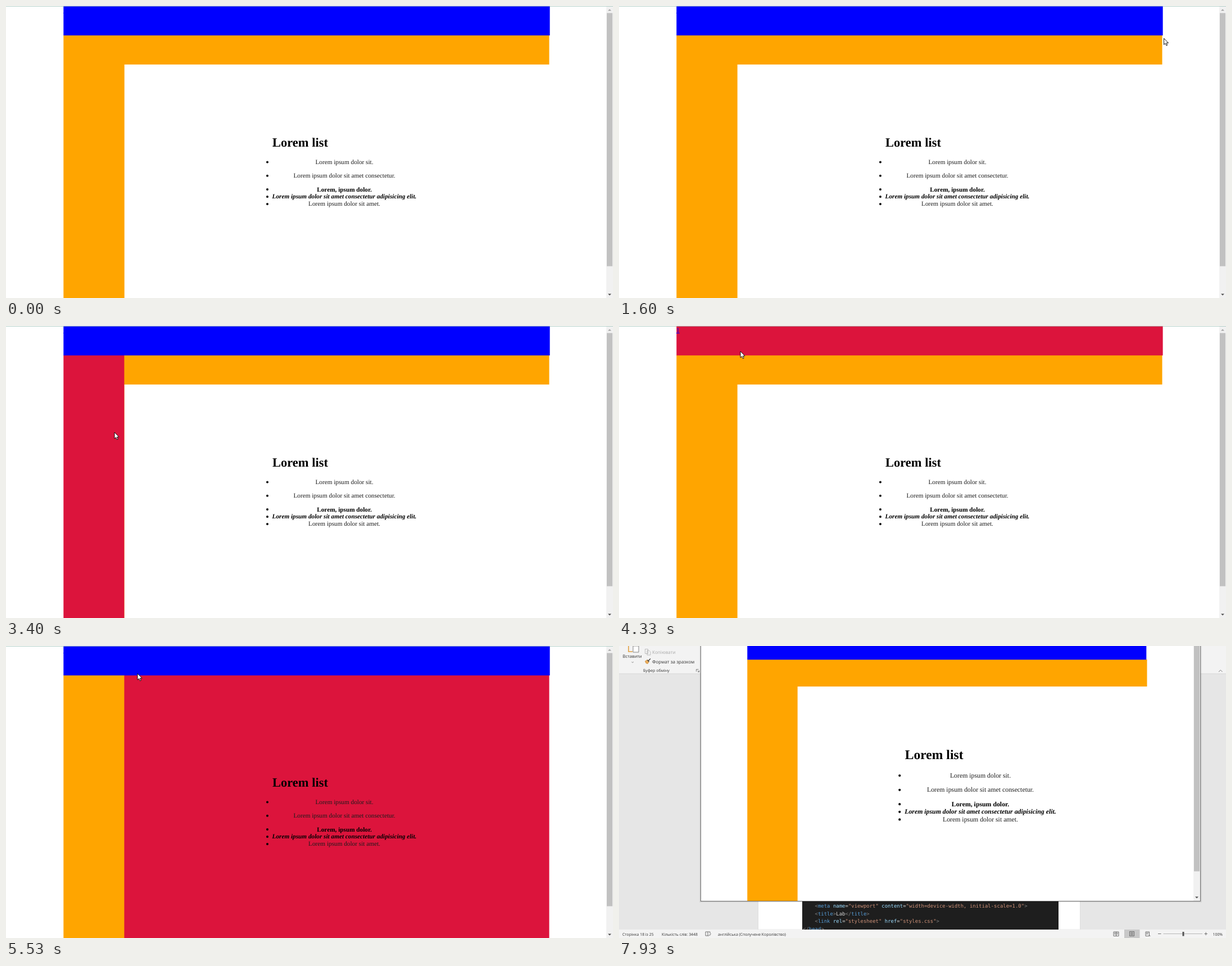
An HTML page for the animation above (8000 ms loop, 1080 by 519 pixels).

```html
<!DOCTYPE html>
<html lang="en">
<head>
<meta charset="utf-8">
<title>Hover demo</title>
<style>
html, body { margin: 0; height: 100%; overflow: hidden; background: #fff; }
svg { display: block; width: 100vw; height: 100vh; text-rendering: geometricPrecision; }
text { white-space: pre; }
.list { font: 11.25px "Liberation Serif", serif; }
.list .mid { text-anchor: middle; }
.list .b { font-weight: bold; }
.list .i { font-style: italic; }
.list .h { font-size: 22.5px; }
.ui { font: 6.9px "Open Sans", sans-serif; fill: #333; }
.code { font: 8.98px "DejaVu Sans Mono", monospace; fill: #9cdcfe; }
.tag { fill: #569cd6; }
.str { fill: #ce9178; }
.mark { fill: #808080; }
.txt { fill: #d4d4d4; }
</style>
</head>
<body>
<svg viewBox="0 0 1080 519" preserveAspectRatio="none">
  <defs>
    <g id="list" class="list">
      <text class="b h" x="474" y="250">Lorem list</text>
      <g class="mid">
        <text x="602" y="281" fill="#1c1c1c">Lorem ipsum dolor sit.</text>
        <text x="602" y="305.3" fill="#1c1c1c">Lorem ipsum dolor sit amet consectetur.</text>
        <text x="602" y="329.5" class="b">Lorem, ipsum dolor.</text>
        <text x="602" y="342.4" class="b i">Lorem ipsum dolor sit amet consectetur adipisicing elit.</text>
        <text x="602" y="355.3" fill="#1c1c1c">Lorem ipsum dolor sit amet.</text>
      </g>
      <path d="M465 277.5h0M465 301.8h0M465 326h0M465 339h0M465 352h0" stroke="#000" stroke-width="4" stroke-linecap="round"/>
    </g>
  </defs>

  <g id="page">
    <rect width="1080" height="519" fill="#fff"/>
    <g id="body">
      <rect id="main" x="210" y="52" width="756.5" height="530"/>
      <rect id="white" x="210.5" y="104" width="757" height="480" fill="#fff"/>
      <use href="#list"/>
    </g>
    <rect id="side" x="102.3" y="52" width="108.1" height="467"/>
    <rect id="head" x="102.3" width="865.3" height="52.3"/>
    <text class="list" x="102" y="11" fill="#00f" text-decoration="underline">1</text>
    <rect x="1068" width="12" height="519" fill="#f1f1f1"/>
    <rect id="thumb" x="1069" y="12.5" width="10" height="450" fill="#c1c1c1"/>
    <path id="up" d="M1071 8.5l3-3 3 3z"/>
    <path id="down" d="M1071 511.5l3 3 3-3z"/>
    <rect width="1080" height=".8" fill="#a5c8c0"/>
    <path id="arrow" d="M.5 .5V11.7L3.1 9.4 4.9 13.4 6.7 12.6 5 8.7H8.5Z" fill="#fff" stroke="#000" stroke-width=".9"/>
    <path id="beam" d="M-2-6.5H-.6L0-6 .6-6.5H2M0-6V6M-2 6.5H-.6L0 6 .6 6.5H2" fill="none" stroke="#333" stroke-width=".8"/>
  </g>

  <g id="desk">
    <rect width="1080" height="519" fill="#e6e6e6"/>
    <rect width="1080" height="49" fill="#f3f3f3"/>
    <path d="M0 49.3H1080M147.5 0V46" stroke="#d0d0d0" stroke-width=".7"/>
    <g class="ui">
      <text x="6.5" y="21" font-size="7.7">Вставити</text>
      <text x="59" y="14" font-size="8.1" fill="#aaa">Копіювати</text>
      <text x="59" y="30.5" font-size="8.1">Формат за зразком</text>
      <text x="43" y="46" font-size="7.1">Буфер обміну</text>
    </g>
    <g fill="none" stroke="#666" stroke-width=".8">
      <path d="M17 0V10H24" stroke="#e0a040" stroke-width="1.6"/>
      <path d="M25 0H35V11H25Z" fill="#fff"/>
      <path d="M22.5 28l1.7 1.7 1.7-1.7M137.5 45.5v-4h4M139.5 43.5l3 2.5M142.7 43.5v2.5h-2.6M1067 46l3.3-3.3 3.3 3.3"/>
      <path d="M46.5 5.5h5v8h-5zM50 8h3.500l2.500 2.500v5.500h-6z" stroke="#b0b0b0" fill="#f3f3f3"/>
      <path d="M46.5 27l4-2.500 3 3-2.500 4-3-1z" fill="#eeb060" stroke="#c88a30"/>
      <path d="M50.500 25l3 3M52 26.500l4-4" stroke="#444" stroke-width="1.4"/>
    </g>
    <rect x="247.500" y="440" width="573" height="64" fill="#fff" stroke="#d0d0d0" stroke-width=".6"/>
    <rect x="326" y="440" width="456" height="64" fill="#1e1e1e"/>
    <g class="code">
      <text x="348.500" y="465"><tspan class="mark">&lt;</tspan><tspan class="tag">meta</tspan> name<tspan class="txt">=</tspan><tspan class="str">"viewport"</tspan> content<tspan class="txt">=</tspan><tspan class="str">"width=device-width, initial-scale=1.0"</tspan><tspan class="mark">&gt;</tspan></text>
      <text x="348.500" y="478.500"><tspan class="mark">&lt;</tspan><tspan class="tag">title</tspan><tspan class="mark">&gt;</tspan><tspan class="txt">Lab</tspan><tspan class="mark">&lt;/</tspan><tspan class="tag">title</tspan><tspan class="mark">&gt;</tspan></text>
      <text x="348.500" y="492"><tspan class="mark">&lt;</tspan><tspan class="tag">link</tspan> rel<tspan class="txt">=</tspan><tspan class="str">"stylesheet"</tspan> href<tspan class="txt">=</tspan><tspan class="str">"styles.css"</tspan><tspan class="mark">&gt;</tspan></text>
      <text x="327" y="505.500"><tspan class="mark">&lt;/</tspan><tspan class="tag">head</tspan><tspan class="mark">&gt;</tspan></text>
    </g>
    <rect y="504" width="1080" height="15" fill="#f3f3f3"/>
    <g class="ui">
      <text x="6" y="514.500">Сторінка 18 із 25</text>
      <text x="76" y="514.500">Кількість слів: 3448</text>
      <text x="176" y="514.500">англійська (Сполучене Королівство)</text>
      <text x="1056.500" y="514.500">100%</text>
    </g>
    <rect x="899" y="504" width="27.500" height="15" fill="#c8c8c8"/>
    <g fill="none" stroke="#555" stroke-width=".8">
      <path d="M154 508h4v7h-4zM158 508h4v3M158 515h2M160 513l1.500 1.500 2-3.500"/>
      <path d="M880 508h4.500v7.500h-4.500zM884.500 508h4.500v7.500h-4.500zM881 510h2.500m2 0h2.500M881 512h2.500m2 0h2.500"/>
      <path d="M908.500 507.500h8v8h-8zM910 509.500h5m-5 2h5m-5 2h5"/>
      <path d="M937 508h6.500v7.500h-6.500zM938 510h4.500m-4.500 2h3m1.500 1 3 3"/>
      <path d="M959 511.500h5.500M1041.500 511.500h5.500M1044.200 508.700v5.500"/>
      <path d="M968.500 511.500H1038" stroke="#aaa"/>
    </g>
    <rect x="1002.500" y="508" width="3" height="7.500" fill="#555"/>
    <rect x="143.500" y="-9" width="893" height="464.500" fill="#000" opacity=".12"/>
    <rect x="145.500" y="-9" width="889" height="462.500" fill="#fff" stroke="#666" stroke-width=".9"/>
    <path d="M228.300 24H939.500V72H317.700V453H228.300Z" fill="orange"/>
    <rect x="228.300" width="710" height="24.300" fill="#00f"/>
    <use href="#list" transform="translate(11.500 -60.800) scale(1.049)"/>
    <rect x="1022" width="12" height="453" fill="#f1f1f1"/>
    <rect x="1023" width="10" height="400.500" fill="#c1c1c1"/>
    <path d="M1025 445.500l3 3 3-3z" fill="#505050"/>
  </g>
</svg>
<script>
const LOOP = 8000, STEP = 200 / 3, MAX_SCROLL = 51;
const el = id => document.getElementById(id);
const set = (id, name, value) => el(id).setAttribute(name, value);

// Pointer path: step, x, y
const path = [
  [0, 474, 242], [3, 560, 180], [6, 700, 85], [12, 960, 60], [13, 961, 34],
  [14, 969, 50], [15, 969, 57], [24, 969, 57], [26, 940, 70], [30, 800, 30],
  [36, 620, 30], [42, 300, 35], [45, 170, 40], [47, 170, 120], [51, 192.5, 188.5],
  [58, 180, 150], [62, 185, 80], [63, 200, 48], [65, 215.5, 44.5], [69, 225, 75],
  [71, 190, 80], [73, 225, 40], [74, 238, 56], [78, 250, 70], [80, 240, 60],
  [82, 240, 60], [83, 233.5, 48.5], [85, 300, 32], [90, 560, 30], [91, 610, 62],
  [92, 640, 66], [95, 640, 66], [97, 650, 45], [99, 668.5, 29], [101, 690, 80],
  [103, 700, 160], [104, 702, 170], [120, 702, 170]
];

function pointer(step) {
  const i = Math.max(1, path.findIndex(p => p[0] >= step));
  const [s0, x0, y0] = path[i - 1], [s1, x1, y1] = path[i];
  const k = (step - s0) / (s1 - s0);
  return [x0 + (x1 - x0) * k, y0 + (y1 - y0) * k];
}

const clamp = v => Math.min(1, Math.max(0, v));
const ease = v => v * v * (3 - 2 * v);
const pulse = (s, from, to) => ease(clamp((s - from) / 3)) * ease(clamp((to - s) / 3));
const scrollAt = s => MAX_SCROLL * (pulse(s, 33, 40) + pulse(s, 53, 60));

function hovered([x, y], scroll) {
  if (x < 102 || x > 967.5) return "";
  if (y < 52) return "head";
  if (x < 210) return "side";
  return y < 104 - scroll ? "main" : "";
}

function draw(step) {
  const away = step >= 119;
  el("desk").style.display = away ? "" : "none";
  el("page").style.display = away ? "none" : "";
  if (away) return;

  const [x, y] = pointer(step), scroll = scrollAt(step);
  // Hover colours follow the pointer one step late
  const hot = hovered(pointer(Math.max(0, step - 1)), scroll);
  for (const [id, color] of [["head", "#00f"], ["side", "orange"], ["main", "orange"]])
    set(id, "fill", id === hot ? "crimson" : color);
  el("white").style.display = hot === "main" ? "none" : "";

  set("body", "transform", `translate(0 ${-scroll})`);
  set("thumb", "y", 12.5 + scroll * 44 / MAX_SCROLL);
  set("up", "fill", scroll > 0 ? "#505050" : "#a3a3a3");
  set("down", "fill", scroll < MAX_SCROLL ? "#505050" : "#a3a3a3");

  const onTitle = x >= 474 && x < 573 && y > 230 && y < 256;
  el("arrow").style.display = onTitle ? "none" : "";
  el("beam").style.display = onTitle ? "" : "none";
  set("arrow", "transform", `translate(${x} ${y})`);
  set("beam", "transform", `translate(${x + 2.5} ${y})`);
}

const start = performance.now();
function tick() {
  const t = (performance.now() - start) % LOOP;
  draw(Math.floor(t / STEP + 0.1));
  requestAnimationFrame(tick);
}
draw(0);
requestAnimationFrame(tick);
</script>
</body>
</html>
```
